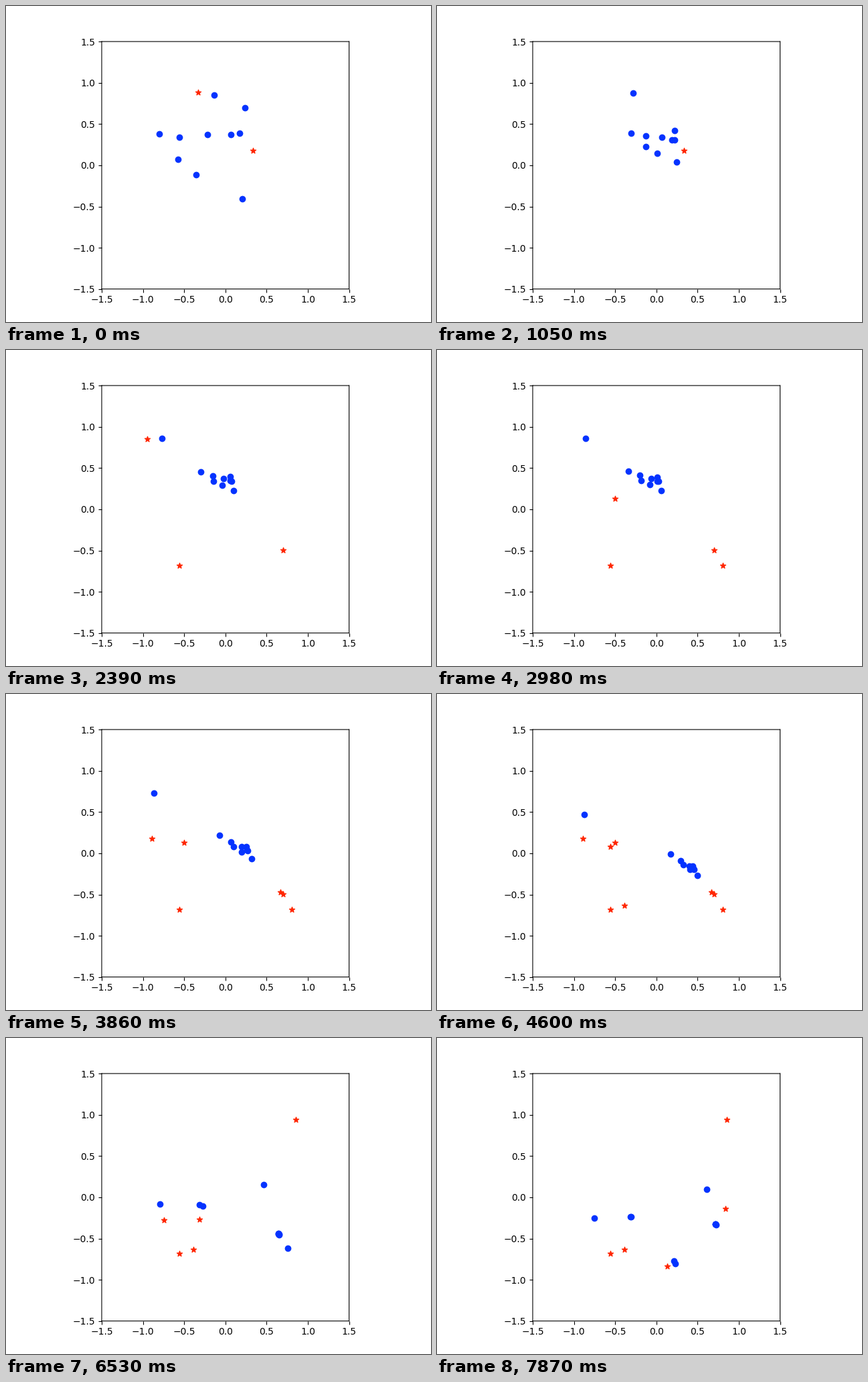
A matplotlib script for the animation above (8 s loop, 635x472 px).

```python
import matplotlib.pyplot as plt
import numpy as np
from matplotlib.animation import FuncAnimation

W, H, DPI = 635, 472, 100
LOOP, STEPS = 8000, 54
SIDE, LEFT, BOTTOM = 369.6, 143.0, 49.3
CENTER = np.array([LEFT + SIDE / 2, H - BOTTOM - SIDE / 2])
BLUE, RED = "#0433ff", "#ff2600"

SPEED, REACH = 0.2, 110  # pull per step, and the distance over which it fades

# stage pixels: 0 scout, 1-2 pair, 3 loner, 4-7 cluster, 8-9 bottom hunters
START = [(311, 132.5), (229, 190.5), (258.5, 196), (257, 229), (284, 252),
         (301, 191.5), (357, 152), (353, 287.5), (336, 192), (349, 189.5)]


class Star:
    """Visible for the steps in shown; pulls its team (and the rest, weaker) during pull."""

    def __init__(self, x, y, shown, pull=(0, 0), team="", gain=1, rest=0):
        self.at = np.array([x, y])
        self.shown, self.pull = shown, pull
        self.gain = np.array([gain if str(i) in team else rest for i in range(len(START))])

    def visible(self, step):
        return self.shown[0] <= step < self.shown[1]

    def force(self, pos, step):
        if not self.pull[0] < step <= self.pull[1]:
            return 0
        gap = self.at - pos
        dist = np.hypot(*gap.T)
        return (SPEED * self.gain * np.exp(-dist / REACH))[:, None] * gap


stars = [
    Star(286.5, 128.5, (0, 7), (0, 7), "0", rest=0.3),
    Star(368.5, 215.5, (0, 11), (0, 11), "123456789"),
    Star(210.5, 132.5, (8, 19), (8, 19), "0", gain=1.2, rest=0.5),
    Star(414, 299, (13, 38), (19, 31), "123456789"),
    Star(258.5, 322, (15, STEPS)),
    Star(426.5, 322, (17, 44), (31, 44), "9"),
    Star(265.5, 221.5, (19, 35), (31, 35), "12"),
    Star(410, 296, (24, 44), (31, 44), "45678"),
    Star(218, 216, (24, 38), (24, 38), "0"),
    Star(259, 227.5, (28, 36), (31, 36), "12"),
    Star(280, 315.5, (31, STEPS)),
    Star(236, 272, (37, 52), (38, STEPS), "0", gain=1.2),
    Star(289, 270.5, (40, 52), (40, STEPS), "12"),
    Star(432.5, 122, (39, STEPS), (39, 45), "3"),
    Star(343.5, 341, (45, STEPS), (45, STEPS), "89", gain=1.5),
    Star(430.5, 254.5, (45, STEPS), (45, STEPS), "34567", gain=0.4),
]


def simulate():
    pos = np.array(START, float)
    track = [pos]
    for step in range(1, STEPS):
        pos = pos + sum(star.force(pos, step) for star in stars)
        track.append(pos)
    return track


def to_data(points):
    return (np.array(points) - CENTER) * (3 / SIDE, -3 / SIDE)


track = simulate()

fig = plt.figure(figsize=(W / DPI, H / DPI), dpi=DPI, facecolor="white")
ax = fig.add_axes([LEFT / W, BOTTOM / H, SIDE / W, SIDE / H])
# scatter keeps sub-pixel positions, plot markers would be rounded
targets = ax.scatter([0], [0], s=36, marker="*", color=RED, linewidths=1, snap=False)
robots = ax.scatter([0], [0], s=36, marker="o", color=BLUE, linewidths=1, snap=False)
ax.set_xlim(-1.5, 1.5)
ax.set_ylim(-1.5, 1.5)
for spine in ax.spines.values():
    spine.set_snap(False)


def draw(step):
    targets.set_offsets(to_data([star.at for star in stars if star.visible(step)]))
    robots.set_offsets(to_data(track[step]))
    return targets, robots


anim = FuncAnimation(fig, draw, frames=STEPS, interval=LOOP / STEPS,
                     init_func=lambda: draw(0), repeat=True, repeat_delay=0)
plt.show()
```
